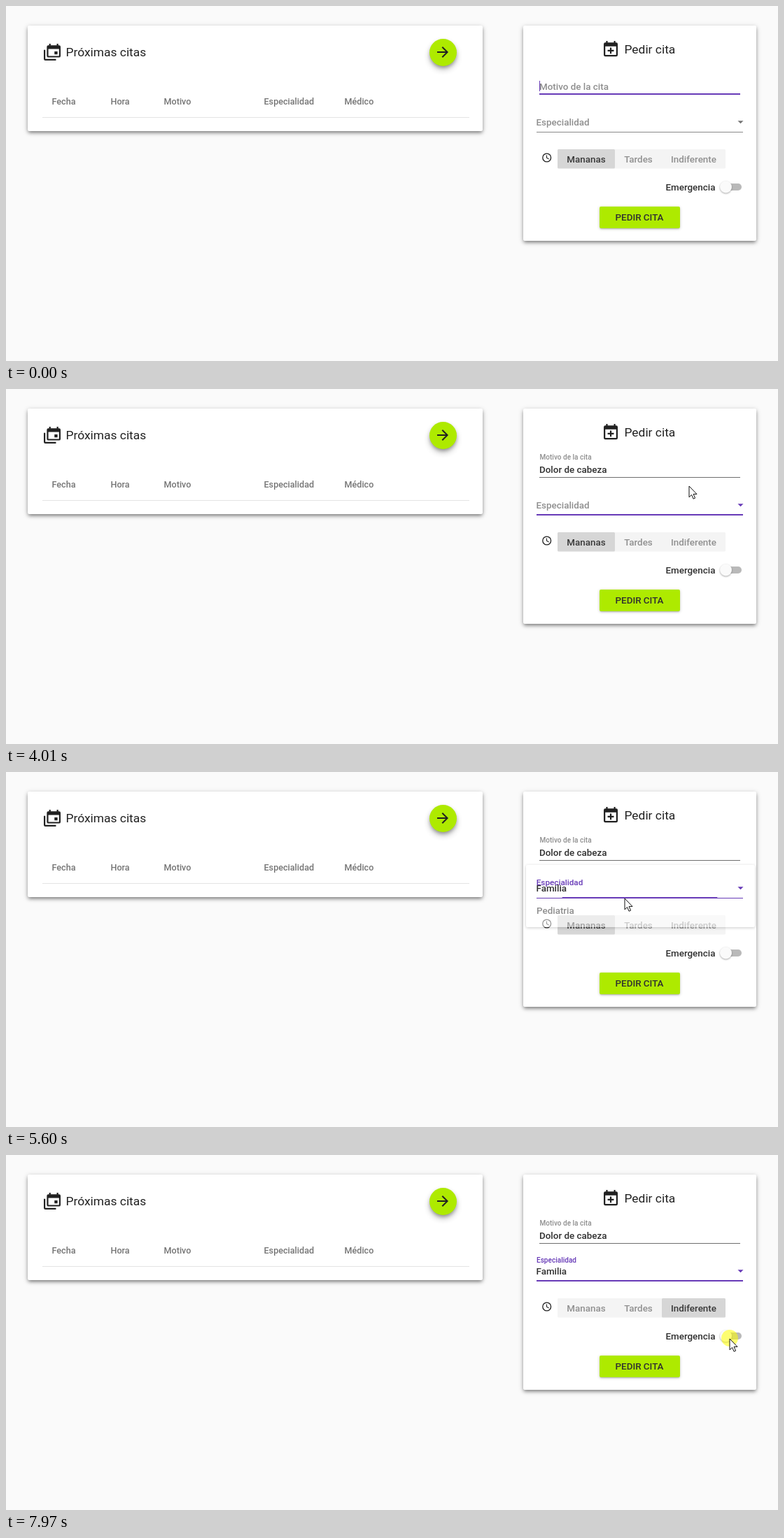
These frames come from a looping animation (1103x508 px, 8 s). An HTML page:

```html
<!DOCTYPE html>
<html lang="es">
<head>
<meta charset="utf-8">
<title>Pedir cita</title>
<style>
  html, body { margin: 0; width: 100%; height: 100%; overflow: hidden; background: #fafafa; }
  .box { position: absolute; background: #fff; border-radius: 2px; }
  .card { box-shadow: 0 3px 5px -1px rgba(0,0,0,.36), 0 2px 7px rgba(0,0,0,.26); }
  .lime { background: #aeea00; }
  #fab { border-radius: 50%; box-shadow: 0 3px 5px -1px rgba(0,0,0,.3), 0 5px 9px rgba(0,0,0,.24); }
  #send { box-shadow: 0 2px 2px -1px rgba(0,0,0,.2), 0 1px 4px rgba(0,0,0,.2); }
  svg { position: absolute; left: 0; top: 0; }
  text { font: 500 13.4px Roboto, sans-serif; fill: #303030; white-space: pre; }
  .title { font-size: 17.4px; font-weight: 400; fill: #212121; }
  .head text { font-size: 12.6px; fill: #757575; }
  .hint { fill: #8e8e8e; }
  .icon { fill: #212121; }
  #panel rect:first-child { filter: drop-shadow(0 1px 2px rgba(0,0,0,.38)); }
  #thumb { filter: drop-shadow(0 1px 1px rgba(0,0,0,.35)); }
</style>
</head>
<body>
<div class="box card" style="left:31px;top:28px;width:650px;height:151px"></div>
<div class="box card" style="left:739px;top:28px;width:333px;height:308px"></div>
<div class="box lime" id="fab" style="left:604.5px;top:46.5px;width:39px;height:39px"></div>
<div class="box lime" id="send" style="left:848px;top:287px;width:115px;height:31px"></div>

<svg width="1103" height="508" viewBox="0 0 1103 508">
  <!-- upcoming list -->
  <path class="icon" transform="translate(52.9 52.9) scale(1.09)" d="M21 17V8H7v9h14M21 3a2 2 0 0 1 2 2v12a2 2 0 0 1-2 2H7a2 2 0 0 1-2-2V5a2 2 0 0 1 2-2h1V1h2v2h8V1h2v2h1M3 21h14v2H3a2 2 0 0 1-2-2V9h2v12M19 15h-4v-4h4z"/>
  <text class="title" x="85.5" y="72">Próximas citas</text>
  <path class="icon" transform="translate(612 54)" d="M12 4l-1.41 1.41L16.17 11H4v2h12.17l-5.58 5.59L12 20l8-8z"/>
  <g class="head">
    <text x="65.5" y="141">Fecha</text>
    <text x="149.5" y="141">Hora</text>
    <text x="225.5" y="141">Motivo</text>
    <text x="368.5" y="141">Especialidad</text>
    <text x="483.5" y="141">Médico</text>
  </g>
  <rect x="52" y="159" width="610" height="1" fill="#e4e4e4"/>

  <!-- request form -->
  <path class="icon" transform="translate(850.7 48.9) scale(1.11)" d="M19 19V8H5v11h14M16 1h2v2h1a2 2 0 0 1 2 2v14a2 2 0 0 1-2 2H5a2 2 0 0 1-2-2V5a2 2 0 0 1 2-2h1V1h2v2h8V1M11 9.5h2v3h3v2h-3v3h-2v-3H8v-2h3z"/>
  <text class="title" x="883.5" y="68">Pedir cita</text>

  <text class="hint" id="reasonLabel">Motivo de la cita</text>
  <text id="reason" x="762" y="119.5"></text>
  <rect id="caret" y="107" width="1" height="15" fill="#673ab7"/>
  <rect x="762" y="126" width="287" height="1" fill="#6e6e6e"/>
  <rect id="reasonLine" x="762" y="125" width="287" height="2" fill="#673ab7"/>

  <g transform="translate(772.7 217)" fill="none" stroke="#212121" stroke-width="1.3">
    <circle r="5.9"/><path d="M-.2-3.4V.3L2.9 2.1" stroke-width="1.1"/>
  </g>
  <rect x="788" y="205" width="240" height="27.5" rx="1.5" fill="#f4f4f4"/>
  <g id="slots"></g>

  <text x="942.5" y="264">Emergencia</text>
  <rect x="1021" y="254" width="30" height="10" rx="5" fill="#b9b9b9"/>
  <circle id="thumb" cx="1028.5" cy="259" r="8.5" fill="#fafafa"/>
  <text x="870.5" y="307">PEDIR CITA</text>

  <g id="panel">
    <rect id="sheet" x="743" y="133" width="327" rx="2" fill="#fff"/>
    <rect id="row" x="743" y="183" width="327" height="32" fill="#f4f4f4"/>
    <text id="optA" x="758" y="203">Familia</text>
    <text id="optB" x="758">Pediatria</text>
  </g>

  <g id="field">
    <rect id="fieldBase" x="758" y="180" width="295" height="1"/>
    <rect id="fieldLine" y="179" height="2" fill="#673ab7"/>
    <path id="drop" d="M1045.5 164.3h8l-4 4z"/>
  </g>
  <text id="fieldLabel">Especialidad</text>
  <text id="value" x="757.5" y="171">Familia</text>

  <circle id="spot" r="12" fill="#ffff00" fill-opacity=".55"/>
  <path id="mouse" d="M0 0V15.8L3.6 12.4 6.1 18.2 8.6 17.1 6.1 11.4H11z" fill="#fff" stroke="#111" stroke-width="1"/>
</svg>

<script>
const LOOP = 8000, PURPLE = '#673ab7', GREY = '#8e8e8e';
const $ = id => document.getElementById(id);
const set = (el, attrs) => { for (const k in attrs) el.setAttribute(k, attrs[k]); };
const ramp = (t, start, len) => Math.min(1, Math.max(0, (t - start) / len));
const out = u => 1 - (1 - u) ** 3;
const within = (t, a, b) => t >= a && t < b;

const phrase = 'Dolor de cabeza';
const keys = [570, 700, 850, 990, 1190, 1300, 1410, 1520, 1630, 1780, 1890, 2000, 2110, 2840, 2990];

// time, x, y of the pointer tip
const trail = [
  [3900, 980, 138], [4010, 976, 139], [4260, 975, 164], [4740, 975, 164],
  [5000, 885, 187], [5380, 885, 187], [5600, 884, 181], [5850, 884, 188],
  [6160, 881, 231], [6200, 881, 231], [6370, 972, 231], [6930, 972, 231],
  [7260, 1048, 286], [7570, 1034, 264], [7640, 1034, 263]
];
const clicks = [[4360, 4510], [5380, 5500], [6780, 6930], [7950, 8000]];

const slots = [['Mananas', 788, 82], ['Tardes', 870, 67], ['Indiferente', 937, 91]].map(([name, x, w]) => {
  const ns = 'http://www.w3.org/2000/svg';
  const bg = document.createElementNS(ns, 'rect');
  const label = document.createElementNS(ns, 'text');
  set(bg, { x, y: 205, width: w, height: 27.5, rx: 1.5 });
  set(label, { x: x + w / 2, y: 223.5, 'text-anchor': 'middle' });
  label.textContent = name;
  $('slots').append(bg, label);
  return { bg, label };
});

function pointer(t) {
  let i = trail.findIndex(p => p[0] > t);
  if (i < 0) i = trail.length;
  const a = trail[Math.max(0, i - 1)], b = trail[Math.min(i, trail.length - 1)];
  const u = b[0] > a[0] ? ramp(t, a[0], b[0] - a[0]) : 0;
  const s = u * u * (3 - 2 * u);
  return [a[1] + (b[1] - a[1]) * s, a[2] + (b[2] - a[2]) * s];
}

function floatLabel(el, x, y, rise, p, fill) {
  el.setAttribute('transform', `translate(${x + p * .5} ${y - rise * p}) scale(${1 - p * .25})`);
  el.style.fill = fill;
}

function drawReason(t) {
  const typed = phrase.slice(0, keys.filter(k => k <= t).length);
  const focused = t < 3240;
  $('reason').textContent = typed;
  floatLabel($('reasonLabel'), 762, 119.5, 19, out(ramp(t, 570, 400)), focused && typed ? PURPLE : GREY);
  const caretOn = focused && !within(t, 130, 570) && !within(t, 2600, 2840);
  set($('caret'), { x: 762 + (typed ? $('reason').getComputedTextLength() : 0), opacity: +caretOn });
  $('reasonLine').setAttribute('opacity', 1 - out(ramp(t, 3240, 300)));
}

function drawSelect(t) {
  const chosen = t >= 5518;
  const open = out(ramp(t, 4460, 200)), close = ramp(t, 5490, 240);
  const shown = open * (1 - close);
  const grow = .5 + .5 * out(ramp(t, chosen ? 5518 : 3240, 400));
  const focused = t >= 3240;
  const scale = .3 + .7 * open;

  set($('panel'), { opacity: shown, transform: `translate(0 ${133 * (1 - scale)}) scale(1 ${scale})` });
  $('sheet').setAttribute('height', chosen ? 89 : 121);
  $('row').setAttribute('opacity', chosen ? 0 : ramp(t, 4900, 60));
  $('optA').setAttribute('opacity', +!chosen);
  $('optB').setAttribute('y', chosen ? 203 : 235);

  $('field').setAttribute('opacity', chosen ? 1 : 1 - shown);
  $('fieldBase').setAttribute('fill', focused ? PURPLE : '#8a8a8a');
  $('drop').setAttribute('fill', focused ? PURPLE : '#757575');
  set($('fieldLine'), { x: 905.5 - 147.5 * grow, width: 295 * grow, opacity: +focused });
  floatLabel($('fieldLabel'), 757.5, 171, 17.5, out(ramp(t, 5518, 400)), chosen ? PURPLE : GREY);
  $('value').setAttribute('opacity', +chosen);
}

function drawSlots(t) {
  const picked = t < 6880 ? 0 : 2;
  const hover = [0, ramp(t, 6030, 80) * (1 - ramp(t, 6270, 80)), ramp(t, 6310, 80) * (1 - ramp(t, 7050, 80))];
  slots.forEach(({ bg, label }, i) => {
    const on = i === picked;
    set(bg, { fill: on ? '#d6d6d6' : '#dcdcdc', opacity: on ? 1 : hover[i] });
    label.style.fill = on ? '#383838' : hover[i] > .5 ? '#7d7d7d' : '#909090';
  });
}

function drawPointer(t) {
  const [x, y] = pointer(t);
  set($('mouse'), { transform: `translate(${x} ${y})`, opacity: +(t >= 3900) });
  set($('spot'), { cx: x, cy: y - 1, opacity: +clicks.some(([a, b]) => within(t, a, b)) });
}

const began = performance.now();
function frame() {
  const t = (performance.now() - began) % LOOP;
  drawReason(t);
  drawSelect(t);
  drawSlots(t);
  drawPointer(t);
  requestAnimationFrame(frame);
}
frame();
</script>
</body>
</html>
```
